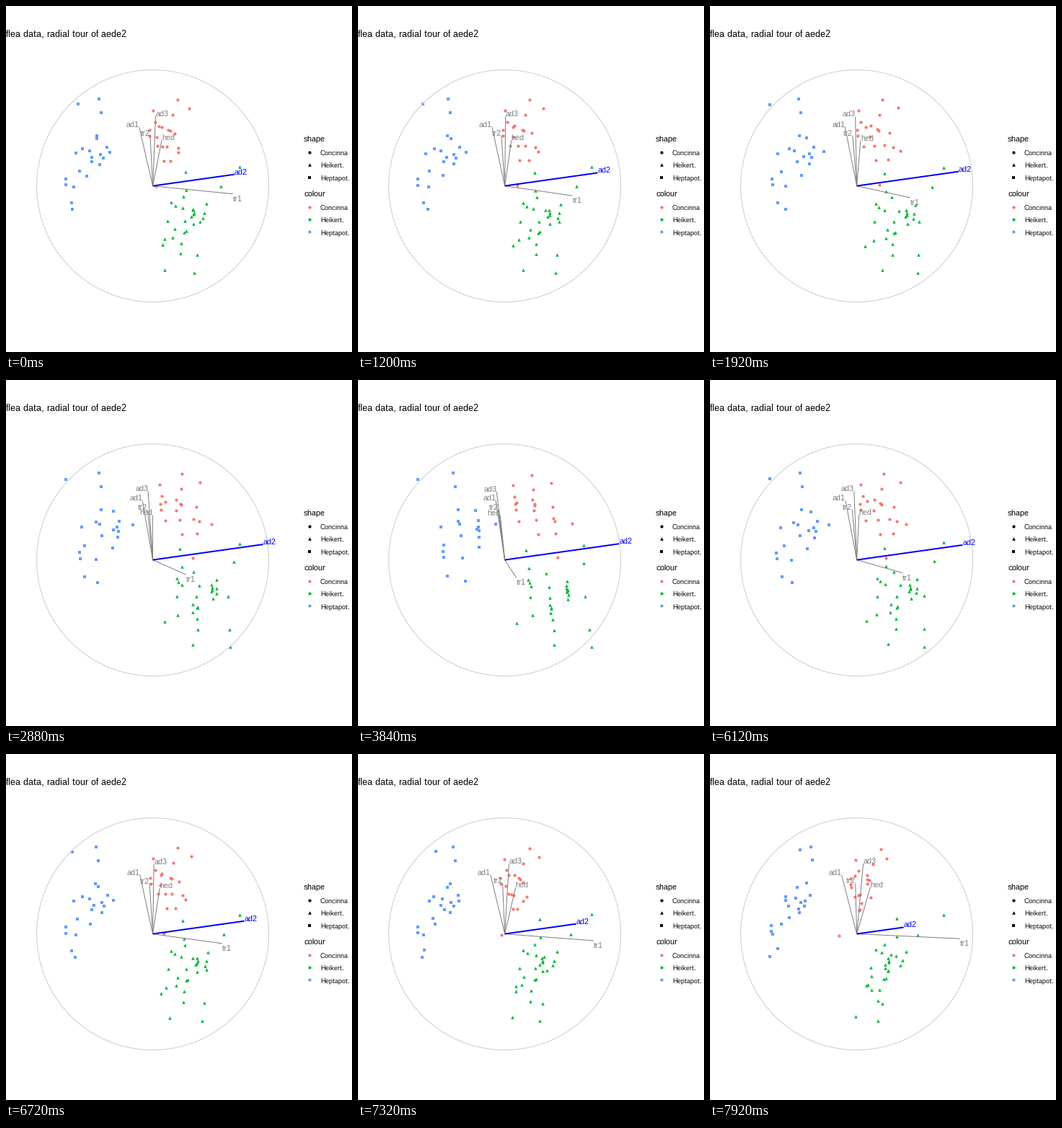
These frames come from a looping animation (480 by 480 pixels, 8000 ms). A matplotlib script:

```python
import numpy as np
import matplotlib.pyplot as plt
from matplotlib.animation import FuncAnimation

plt.rcParams["font.family"] = "Liberation Sans"
plt.rcParams["text.hinting"] = "native"
plt.rcParams["text.hinting_factor"] = 1

SIZE, DPI = 480, 96
PT = 72 / DPI                     # points per pixel
STEP_MS, LOOP_MS = 40, 8000
CX, CY, RADIUS = 203.6, 249.6, 161
SPAN = 1.5 * RADIUS               # width of the data square
THETA = 0.14                      # direction of the moving axis
START, STEP = 0.78, 0.05          # radians

# colour, marker, size, hidden offset,
# {aede2 value: (count, lowest, highest)}, outermost points
SPECIES = {
    "Concinna": ("#F8766D", "o", 4.2, .03,
                 {13: (6, 1.13, 1.41), 14: (8, 1.01, 1.47),
                  15: (6, .82, 1.39), 16: (1, 1.06, 1.06)}, []),
    "Heikert.": ("#00BA38", "^", 4.6, .48,
                 {12: (1, .36, .36), 13: (7, .40, .90), 14: (10, .16, .71),
                  15: (8, .49, .63), 16: (3, .24, .75)},
                 [(1, .543, .103), (1, 1.189, .885)]),
    "Heptapot.": ("#619CFF", "s", 4, -.26,
                  {9: (5, .78, 1.16), 10: (6, .90, 1.45),
                   11: (7, .97, 1.25), 12: (1, 1.13, 1.13)},
                  [(0, .598, 1.543), (.25, .571, 1.559), (.25, .118, .725)]),
}

# Axis: (along, hidden, across) loadings
AXES = {
    "tr1": (0, .960, -.165),
    "tr2": (0, .054, .434),
    "hed": (0, .189, .383),
    "ad1": (0, -.064, .519),
    "ad3": (0, .154, .593),
    "ad2": (1, 0, 0),
}


def angle(t):
    """Angle between the moving axis and the plane at t ms."""
    if t < 720:
        return START
    if t < 4320:
        return START - STEP * ((t - 720) // 240 + 1)
    if t < 4800:
        return 0
    if t < 5760:
        return STEP * ((t - 4800) // 240 + 1)
    return STEP * ((t - 5760) // 120 + 5)


def cluster(offset, levels, outer):
    """Columns of points, denser in the middle, with a tilted hidden part."""
    along, across = [], []
    for level, (n, lo, hi) in levels.items():
        s = np.linspace(-1, 1, n)
        across += list((lo + hi) / 2 + (hi - lo) / 2 * s * abs(s))
        along += [(level - 8) / 8] * n
    across = np.array(across)
    wobble = 0.08 * np.cos(2 * np.arange(len(across)))
    rows = np.column_stack([along, offset + 0.55 * across + wobble, across])
    return np.vstack([rows, *outer])


def project(rows, a):
    along, hidden, across = rows.T
    u = along * np.cos(a) + hidden * np.sin(a)
    c, s = np.cos(THETA), np.sin(THETA)
    return np.column_stack([u * c - across * s, u * s + across * c])


fig = plt.figure(figsize=(SIZE / DPI, SIZE / DPI), dpi=DPI, facecolor="white")
ax = fig.add_axes([0, 0, 1, 1])
ax.set(xlim=(0, SIZE), ylim=(SIZE, 0))
ax.axis("off")


def label(x, y, text, px, color="black", **kw):
    return ax.text(x, y, text, fontsize=px * PT, color=color,
                   va="baseline", **kw)


def dots(x, y, color, marker, px):
    return ax.scatter(x, y, s=(px * PT) ** 2, c=color, marker=marker,
                      linewidths=0, zorder=2)


label(0, 43, "flea data, radial tour of aede2", 13)
label(413, 188, "shape", 11)
label(413, 264, "colour", 11)

clouds, groups = [], []
for i, (name, spec) in enumerate(SPECIES.items()):
    color, marker, px, *shape = spec
    y = 203 + 17.3 * i
    dots([421], [y], "black", marker, px)
    dots([421], [y + 75.7], color, "o", 4.2)
    label(436, round(y + 4), name, 9)
    label(436, round(y + 80), name, 9)
    groups.append(cluster(*shape))
    clouds.append(dots([], [], color, marker, px))
data = np.vstack(groups)
cuts = np.cumsum([len(g) for g in groups])[:-1]

turn = np.linspace(0, 2 * np.pi, 361)
ax.plot(CX + RADIUS * np.cos(turn), CY + RADIUS * np.sin(turn),
        color="#CCCCCC", lw=PT, zorder=3)

loadings = np.array(list(AXES.values()))
spokes, tags = [], []
for name in AXES:
    moving = name == "ad2"
    color = "#0000FF" if moving else "#7F7F7F"
    spokes += ax.plot([], [], color=color, lw=(2 if moving else 1) * PT,
                      solid_capstyle="butt", zorder=4)
    tags.append(label(CX, CY, name, 11, color, zorder=5))


def update(i):
    a = angle(i * STEP_MS)

    # Points are rescaled to fill the same square at every step
    p = project(data, a)
    lo, hi = p.min(axis=0), p.max(axis=0)
    p = (p - lo) / (hi - lo) - 0.5
    xy = np.column_stack([CX + SPAN * p[:, 0], CY - SPAN * p[:, 1]])
    for cloud, part in zip(clouds, np.split(xy, cuts)):
        cloud.set_offsets(part)

    for (dx, dy), spoke, tag in zip(project(loadings, a), spokes, tags):
        x, y = CX + RADIUS * dx, CY - RADIUS * dy
        spoke.set_data([CX, x], [CY, y])
        tag.set_position((x, y if dy > 0 else y + 10))
        tag.set_ha("left" if dx > 0 else "right")
    return clouds + spokes + tags


anim = FuncAnimation(fig, update, frames=LOOP_MS // STEP_MS,
                     interval=STEP_MS, repeat=True, repeat_delay=0)
plt.show()
```
